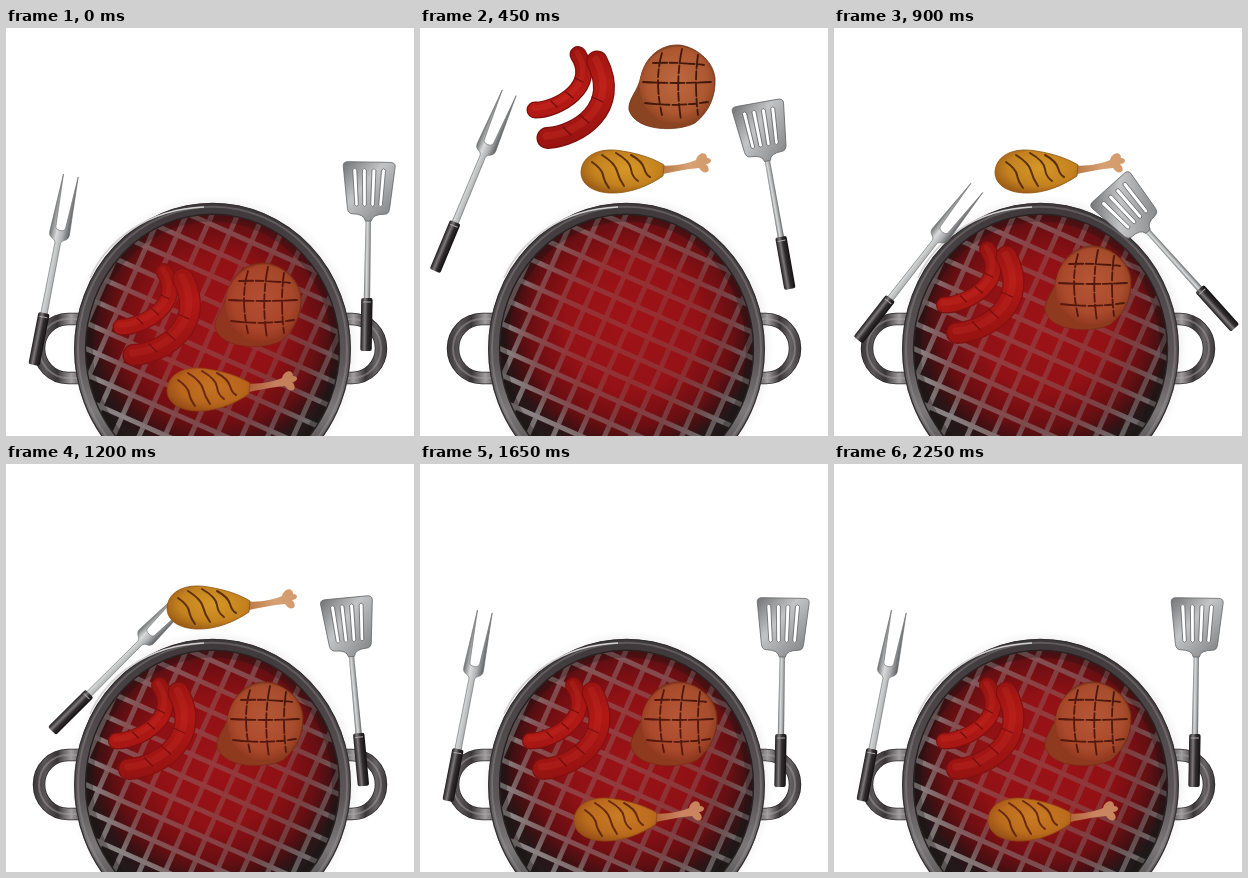
Recreate the animation shown at these times as an HTML page. Size 408 by 408 pixels, loop 2400 ms.

```html
<!DOCTYPE html>
<html lang="en">
<head>
<meta charset="utf-8">
<title>Barbecue</title>
<style>
html, body { margin: 0; width: 100%; height: 100%; overflow: hidden; background: #fff; }
svg { display: block; width: 100vw; height: 100vh; }
</style>
</head>
<body>
<svg viewBox="0 0 408 408">
  <defs>
    <clipPath id="bowl"><ellipse cx="206.5" cy="321" rx="127" ry="135"/></clipPath>
    <radialGradient id="halo">
      <stop offset=".92" stop-color="#999" stop-opacity=".16"/>
      <stop offset="1" stop-color="#bbb" stop-opacity="0"/>
    </radialGradient>
    <linearGradient id="rim" x1="0" y1="0" x2="0" y2="1">
      <stop offset="0" stop-color="#3f393b"/>
      <stop offset=".3" stop-color="#4f494b"/>
      <stop offset=".55" stop-color="#5d5759"/>
      <stop offset=".72" stop-color="#7c7778"/>
      <stop offset=".84" stop-color="#5b5657"/>
      <stop offset="1" stop-color="#4a4546"/>
    </linearGradient>
    <radialGradient id="pit" gradientUnits="userSpaceOnUse" cx="207" cy="300" r="138">
      <stop offset="0" stop-color="#520b0f"/>
      <stop offset=".6" stop-color="#420a0d"/>
      <stop offset=".88" stop-color="#2a1416"/>
      <stop offset="1" stop-color="#211a1b"/>
    </radialGradient>
    <radialGradient id="fire" gradientUnits="userSpaceOnUse" cx="211" cy="297" r="130">
      <stop offset="0" stop-color="#a01317"/>
      <stop offset=".5" stop-color="#981216" stop-opacity=".92"/>
      <stop offset=".78" stop-color="#7c0f13" stop-opacity=".6"/>
      <stop offset="1" stop-color="#550b0e" stop-opacity="0"/>
    </radialGradient>
    <linearGradient id="bars" gradientUnits="userSpaceOnUse" x1="-130" y1="0" x2="130" y2="0">
      <stop offset="0" stop-color="#8f898a"/>
      <stop offset=".5" stop-color="#857b7c"/>
      <stop offset="1" stop-color="#6c6566"/>
    </linearGradient>
    <linearGradient id="ironL" gradientUnits="userSpaceOnUse" x1="27" y1="0" x2="76" y2="0">
      <stop offset="0" stop-color="#3c3738"/>
      <stop offset=".25" stop-color="#5a5556"/>
      <stop offset=".5" stop-color="#3a3536"/>
      <stop offset=".78" stop-color="#a19d9e"/>
      <stop offset="1" stop-color="#5b5657"/>
    </linearGradient>
    <linearGradient id="ironR" gradientUnits="userSpaceOnUse" x1="381" y1="0" x2="338" y2="0">
      <stop offset="0" stop-color="#3c3738"/>
      <stop offset=".25" stop-color="#686364"/>
      <stop offset=".5" stop-color="#3a3536"/>
      <stop offset=".78" stop-color="#a19d9e"/>
      <stop offset="1" stop-color="#5b5657"/>
    </linearGradient>
    <linearGradient id="steel">
      <stop offset="0" stop-color="#717273"/>
      <stop offset=".35" stop-color="#d9dada"/>
      <stop offset=".65" stop-color="#b0b1b2"/>
      <stop offset="1" stop-color="#5d5e5f"/>
    </linearGradient>
    <linearGradient id="blade" x1="0" y1="0" x2="1" y2="1">
      <stop offset="0" stop-color="#717274"/>
      <stop offset=".4" stop-color="#c3c4c5"/>
      <stop offset="1" stop-color="#77797a"/>
    </linearGradient>
    <linearGradient id="grip">
      <stop offset="0" stop-color="#1d1a1b"/>
      <stop offset=".35" stop-color="#7d797a"/>
      <stop offset=".6" stop-color="#322e2f"/>
      <stop offset="1" stop-color="#131112"/>
    </linearGradient>
    <linearGradient id="skin" gradientUnits="userSpaceOnUse" x1="140" y1="20" x2="165" y2="112">
      <stop offset="0" stop-color="#95130f"/>
      <stop offset=".5" stop-color="#b71a15"/>
      <stop offset="1" stop-color="#971310"/>
    </linearGradient>
    <radialGradient id="meat" cx=".5" cy=".45" r=".58">
      <stop offset="0" stop-color="#bd683f"/>
      <stop offset=".7" stop-color="#ae5831"/>
      <stop offset="1" stop-color="#8c4121"/>
    </radialGradient>
    <radialGradient id="drum" cx=".55" cy=".42" r=".62">
      <stop offset="0" stop-color="#d69828"/>
      <stop offset=".65" stop-color="#c4821f"/>
      <stop offset="1" stop-color="#9a5b16"/>
    </radialGradient>
    <linearGradient id="bone">
      <stop offset="0" stop-color="#b06f3a"/>
      <stop offset=".6" stop-color="#d8a173"/>
      <stop offset="1" stop-color="#d39a6a"/>
    </linearGradient>
  </defs>

  <ellipse cx="208" cy="319" rx="146" ry="153" fill="url(#halo)"/>
  <g fill="none" id="handles"></g>
  <ellipse cx="206.5" cy="321" rx="132" ry="140" fill="url(#pit)"/>
  <g clip-path="url(#bowl)">
    <rect id="fireLow" x="70" y="160" width="275" height="250" fill="url(#fire)"/>
    <g id="grate" stroke="url(#bars)" stroke-width="5" transform="translate(207 300) rotate(24)"></g>
    <rect id="fireTop" x="70" y="160" width="275" height="250" fill="url(#fire)"/>
    <ellipse cx="206.5" cy="321" rx="124" ry="132" fill="none" stroke="#171213" stroke-width="9" opacity=".3"/>
  </g>
  <g fill="none">
    <ellipse cx="206.5" cy="321" rx="132.5" ry="140.3" stroke="url(#rim)" stroke-width="11.5"/>
    <ellipse cx="206.5" cy="321" rx="134.5" ry="142.3" stroke="#aaa5a6" stroke-width="2" opacity=".3"/>
    <ellipse cx="206.5" cy="321" rx="137.8" ry="145.6" stroke="#353032" stroke-width="1.3"/>
    <ellipse cx="206.5" cy="321" rx="127" ry="134.8" stroke="#262122" stroke-width="1.4"/>
    <path d="M84 250C101 212 142 181 198 179" stroke="#d3d0d1" stroke-width="1.5"/>
  </g>

  <g id="fork">
    <path fill="url(#steel)" stroke="#6b6c6d" stroke-width=".6" d="M-3.2-48L-2.8-124C-3-129-10-127-10-134L-7.5-193L-5-141Q-5-137 0-137Q5-137 5-141L7.5-193L10-134C10-127 3-129 2.8-124L3.2-48Z"/>
  </g>
  <g id="spatula">
    <path fill="url(#steel)" d="M-3.2-48L-2.6-138H2.6L3.2-48Z"/>
    <path id="head" fill="url(#blade)" stroke="#646566" stroke-width=".8" fill-rule="evenodd"/>
  </g>

  <g id="chicken">
    <path fill="url(#bone)" d="M236 137C252 139 266 136 276 132C278 124 287 123 287 130C293 130 292 136 286 136C293 143 285 149 279 140C268 141 252 144 238 147Z"/>
    <path fill="url(#drum)" stroke="#8f5312" stroke-width=".8" d="M161 144C162 127 180 119 202 123C222 126 236 132 244 137L243 148C230 157 210 166 190 165C172 164 161 156 161 144Z"/>
    <path fill="none" stroke="#5a2f0d" stroke-width="2" stroke-linecap="round" d="M172 134Q182 141 183 147T189 160M182 127Q195 135 197 143T204 158M196 125Q210 133 211 141T218 153M211 127Q222 133 224 140T230 149"/>
  </g>
  <g id="steak">
    <path fill="#8b4421" stroke="#6f3216" stroke-width=".8" d="M209 82C208 70 218 64 221 48C225 30 240 16 259 17C273 18 293 31 295 50C296 68 289 84 275 95C258 104 216 104 209 82Z"/>
    <path fill="url(#meat)" d="M220 62C217 39 236 19 258 18.500C278 19 294 36 294 55C294 77 279 95 258 95.500C238 96 222 83 220 62Z"/>
    <path fill="none" stroke="#40190b" stroke-width="1.8" stroke-linecap="round" stroke-dasharray="14 2.5 8 3" d="M233 35Q260 34 284 37M223 54Q256 56 291 54M225 75Q257 79 288 74M242 25Q234 52 242 87M262 21Q255 54 261 92M278 27Q274 54 278 87"/>
  </g>
  <g id="sausages" fill="none" stroke-linecap="round"></g>

  <rect id="warmth" x="70" y="160" width="275" height="250" fill="url(#fire)" clip-path="url(#bowl)"/>
</svg>
<script>
const $ = id => document.getElementById(id);
const stroke = (d, color, w, more = "") =>
  `<path d="${d}" stroke="${color}" stroke-width="${w}" ${more}/>`;

// Metal handles on both sides of the bowl
const handle = (d, iron) => stroke(d, "#2b2728", 12.5) + stroke(d, iron, 11) +
  stroke(d, "#a9a5a6", 2, 'opacity=".45"');
$("handles").innerHTML =
  handle("M76 291H62A29 29.5 0 0 0 62 350H78", "url(#ironL)") +
  handle("M338 291H346A29 29.5 0 0 1 346 350H336", "url(#ironR)");

let steep = "", flat = "";
for (let i = -7; i <= 7; i++) {
  const p = i * 23.5;
  steep += `<path d="M${p}-170V170"/>`;
  flat += `<path d="M-170 ${p}H170"/>`;
}
$("grate").innerHTML = `<g opacity=".85">${steep}</g>${flat}`;

const sausage = (d, w, marks) =>
  stroke(d, "#7d100e", w) + stroke(d, "url(#skin)", w - 2.5) +
  stroke(d, "#d8382c", w / 3, 'opacity=".25" transform="translate(-1 -2)"') +
  stroke(marks, "#6d0d0c", 1.3);
$("sausages").innerHTML =
  sausage("M115 82C138 82 179 58 158 26.500", 17, "M131 73L137 79M146 64L153 70M155 50L163 54") +
  sausage("M127.500 110C158 108 201 80 177 33.500", 22, "M143 99L151 107M160 87L169 95M172 69L183 74");

const grip = '<rect x="-5.7" y="-53" width="11.4" height="53" rx="2" fill="url(#grip)"/>' +
  '<path d="M-4-49H4" stroke="#aaa" stroke-width="1"/>';
$("fork").innerHTML += grip;
$("spatula").innerHTML += grip;

let head = "M-3-130Q-4-137-16-137Q-20-137-21-142L-26-185Q-26-189-21-189H21Q26-189 26-185L21-142Q20-137 16-137Q4-137 3-130Z";
for (const k of [-1.5, -.5, .5, 1.5]) {
  const a = k * 9.6, b = k * 8;
  head += `M${a - 2}-181Q${a}-184 ${a + 2}-181L${b + 1.8}-146Q${b}-143 ${b - 1.8}-146Z`;
}
$("head").setAttribute("d", head);

// [first step, x, y, angle]; each pose holds until the next
const poses = {
  fork: [[0, 28, 337, 11], [3, 15, 243, 22.6], [4, 27, 272, 36], [5, 33, 297, 47],
    [6, 24, 312, 38], [7, 14, 325, 30], [8, 46, 267, 45], [9, 47, 322, 38], [10, 28, 337, 11]],
  spatula: [[0, 360, 323, 1], [3, 370, 261, -10], [4, 374, 262, -25], [5, 404, 231, -44.5],
    [6, 401, 300, -42], [7, 397, 325, -28], [8, 357.5, 322, -5.3], [9, 360, 323, 1]],
  sausages: [[0, 0, 217, 0], [1, 0, 0, 0], [5, 4, 104, 0], [6, -4.5, 195, 0]],
  steak: [[0, 0, 218, 0], [1, 0, 0, 0], [5, 28, 53, 0], [6, 2, 201, 0]],
  chicken: [[0, 0, 218, 0], [1, 0, 0, 0], [9, -7, 212, 0]]
};
const STEP = 150, STEPS = 16;

function draw(ms) {
  const n = Math.floor(ms / STEP) % STEPS;
  for (const id in poses) {
    const [, x, y, a] = poses[id].filter(p => p[0] <= n).pop();
    $(id).setAttribute("transform", `translate(${x} ${y}) rotate(${a})`);
  }
  const away = n > 0 && n < 6;
  const glow = (away ? .94 : .85) + .05 * Math.sin(n * 2.1);
  $("fireLow").setAttribute("opacity", glow);
  $("fireTop").setAttribute("opacity", glow * (away ? .8 : .66));
  $("warmth").setAttribute("opacity", away ? 0 : n ? .22 : .3);
}

const start = performance.now();
function tick() {
  draw(performance.now() - start);
  requestAnimationFrame(tick);
}
tick();
</script>
</body>
</html>
```
